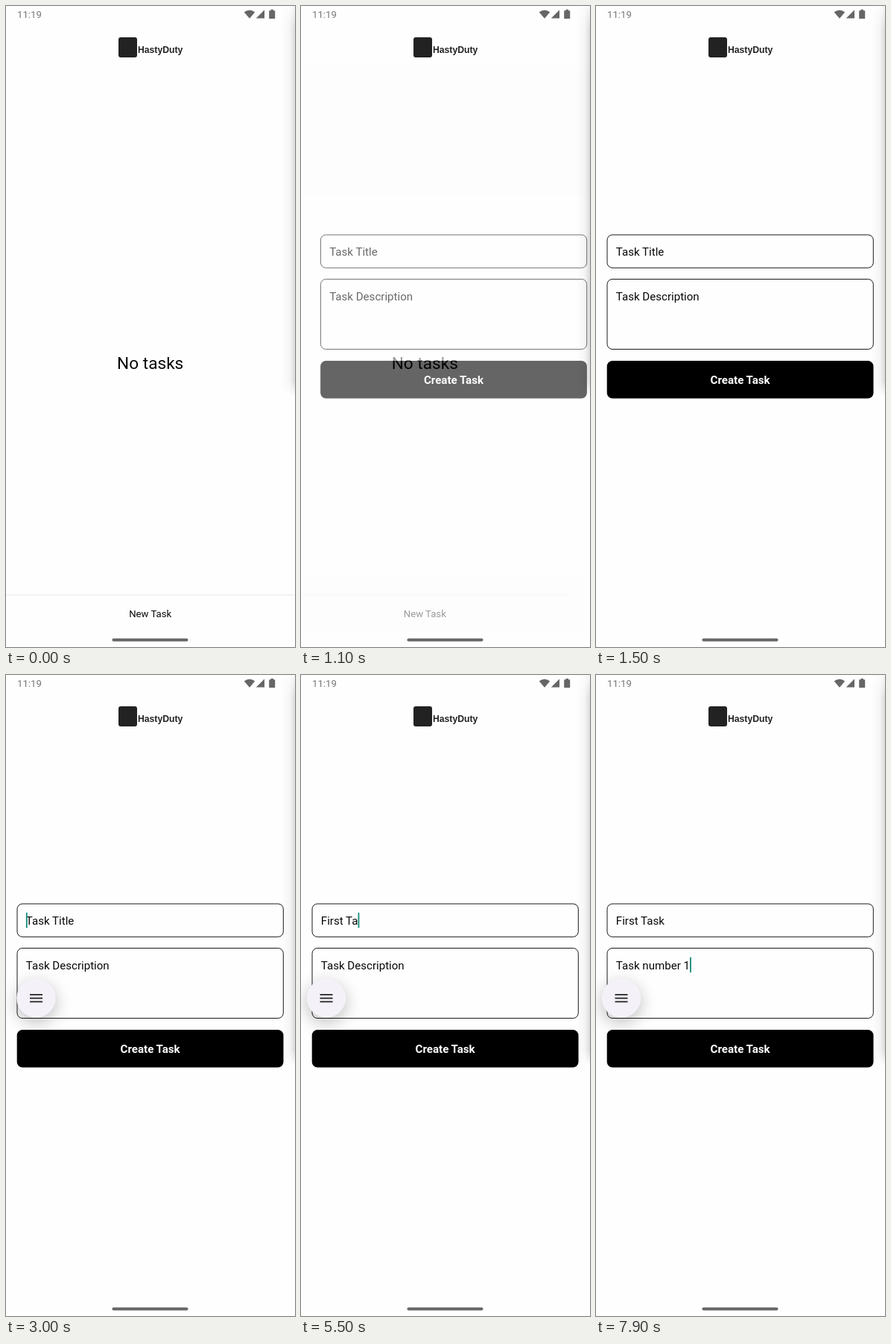
These frames come from a looping animation (388x860 px, 8 s). An HTML page:

```html
<!DOCTYPE html>
<html lang="en">
<head>
<meta charset="utf-8">
<title>Task app</title>
<style>
  html, body { margin: 0; width: 100%; height: 100%; overflow: hidden; background: #fefefe; }
  svg { display: block; width: 100%; height: 100%; }
  text { font-family: Roboto, sans-serif; white-space: pre; fill: #080808; }
  .body { font-size: 15.09px; }
  .small { font-size: 13.2px; }
  .mid { text-anchor: middle; }
  .field { fill: #fefefe; stroke: #1a1a1a; stroke-width: 1; }
  .status { fill: #666; }
</style>
</head>
<body>
<svg viewBox="0 0 388 860">
  <defs>
    <linearGradient id="edge">
      <stop offset="0" stop-color="#000" stop-opacity="0"/>
      <stop offset=".6" stop-color="#000" stop-opacity=".035"/>
      <stop offset="1" stop-color="#000" stop-opacity=".14"/>
    </linearGradient>
    <linearGradient id="edgeFade" x2="0" y2="1">
      <stop offset="0" stop-color="#fff" stop-opacity=".25"/>
      <stop offset=".06" stop-color="#fff"/>
      <stop offset=".96" stop-color="#fff"/>
      <stop offset="1" stop-color="#fff" stop-opacity="0"/>
    </linearGradient>
    <mask id="edgeMask"><rect x="370" width="18" height="524" fill="url(#edgeFade)"/></mask>
    <filter id="blur" x="-100%" y="-100%" width="300%" height="300%">
      <feGaussianBlur stdDeviation="11"/>
    </filter>
  </defs>
  <rect width="388" height="860" fill="#fefefe"/>

  <g id="list">
    <text class="mid" x="193.7" y="487" font-size="22.63">No tasks</text>
    <path d="M0 790H387" stroke="#e6e6e6"/>
    <text id="newTask" class="small mid" x="193.7" y="820">New Task</text>
  </g>

  <g id="form">
    <rect x="-40" y="80" width="500" height="760" fill="#fefefe"/>
    <rect class="field" x="15" y="307" width="357.3" height="44.3" rx="7"/>
    <rect class="field" x="15" y="366.5" width="357.3" height="94" rx="7"/>
    <rect x="14.7" y="476" width="357.8" height="50.5" rx="7.5"/>
    <text id="title" class="body" x="26.8" y="335"></text>
    <text id="desc" class="body" x="26.8" y="395"></text>
    <text class="body mid" x="193.6" y="507.3" font-weight="700" style="fill:#fff">Create Task</text>
    <rect id="cursor" width="1.8" height="20.5" fill="#148a78"/>
  </g>

  <g id="bubble">
    <circle cy="440" r="27" opacity=".24" filter="url(#blur)"/>
    <circle cy="433.5" r="26.2" fill="#f4f2f8"/>
    <path d="M-8.5 428.8h17m-17 4.8h17m-17 4.8h17" stroke="#222" stroke-width="1.8"/>
  </g>
  <rect x="14.7" y="476" width="0" height="0"/>

  <rect x="370" width="18" height="524" fill="url(#edge)" mask="url(#edgeMask)"/>
  <text class="small" x="15" y="15.5" style="fill:#777">11:19</text>
  <path class="status" d="M319.7 8.2Q327 2.6 334.2 8.2L327 16.8ZM335.8 16.5L347 5.2V16.5ZM353.2 6.3h2.2v-1.5h3.6v1.5h2.2v10.6h-8z"/>
  <rect x="151" y="42" width="25" height="27" rx="3" fill="#222"/>
  <text x="177" y="63" style="font:bold 12.2px 'Liberation Sans',Arial,sans-serif;fill:#222">HastyDuty</text>
  <rect x="142.5" y="848.6" width="102" height="3.8" rx="1.9" fill="#666"/>
</svg>
<script>
const LOOP = 8000, STEP = 100, SHIFT = 38.8;
const el = id => document.getElementById(id);
const [list, newTask, form, title, desc, cursor, bubble] =
  ['list', 'newTask', 'form', 'title', 'desc', 'cursor', 'bubble'].map(el);

const titleInput = {
  node: title, text: 'First Task', hint: 'Task Title', cursorY: 318.8,
  keys: [4400, 4600, 4700, 4900, 5100, 5200, 5400, 5500, 5600, 5700]
};
const descInput = {
  node: desc, text: 'Task number 1', hint: 'Task Description', cursorY: 378.6,
  keys: [6400, 6500, 6600, 6700, 6900, 7000, 7100, 7300, 7500, 7600, 7700, 7800, 7900]
};

// The menu bubble slides in, overshoots and settles.
const bubblePath = [-14, 16, 34, 40.5, 37, 34];

function showInput(input, t) {
  const typed = input.keys.filter(k => k <= t).length;
  const value = input.text.slice(0, typed);
  const shown = value || input.hint;
  if (input.node.textContent !== shown) input.node.textContent = shown;
  return value ? input.node.getComputedTextLength() : 0;
}

function cursorOn(t) {
  if (t < 2600) return false;
  return t >= 4400 || Math.floor((t - 2600) / 500) % 2 === 0;
}

function render(time) {
  const t = Math.floor(time / STEP) * STEP;

  const opening = t >= 1100;
  const offset = t >= 1500 ? 0 : 11.4 * Math.exp((1100 - t) / 90);
  list.setAttribute('transform', `translate(${opening ? offset - SHIFT : 0})`);
  newTask.setAttribute('opacity', t === 1000 ? 0.3 : 1);
  form.setAttribute('transform', `translate(${offset})`);
  form.setAttribute('opacity', opening ? (t < 1200 ? 0.6 : 1) : 0);

  const titleWidth = showInput(titleInput, t);
  const descWidth = showInput(descInput, t);
  const [active, width] = t < 6000 ? [titleInput, titleWidth] : [descInput, descWidth];
  cursor.setAttribute('x', 26.9 + width);
  cursor.setAttribute('y', active.cursorY);
  cursor.setAttribute('opacity', cursorOn(t) ? 1 : 0);

  const i = Math.min((t - 2700) / STEP, bubblePath.length - 1);
  bubble.setAttribute('opacity', i < 0 ? 0 : 1);
  bubble.setAttribute('transform', `translate(${i < 0 ? -60 : bubblePath[i]})`);
}

const start = performance.now();
function tick() {
  render((performance.now() - start) % LOOP);
  requestAnimationFrame(tick);
}
tick();
</script>
</body>
</html>
```
